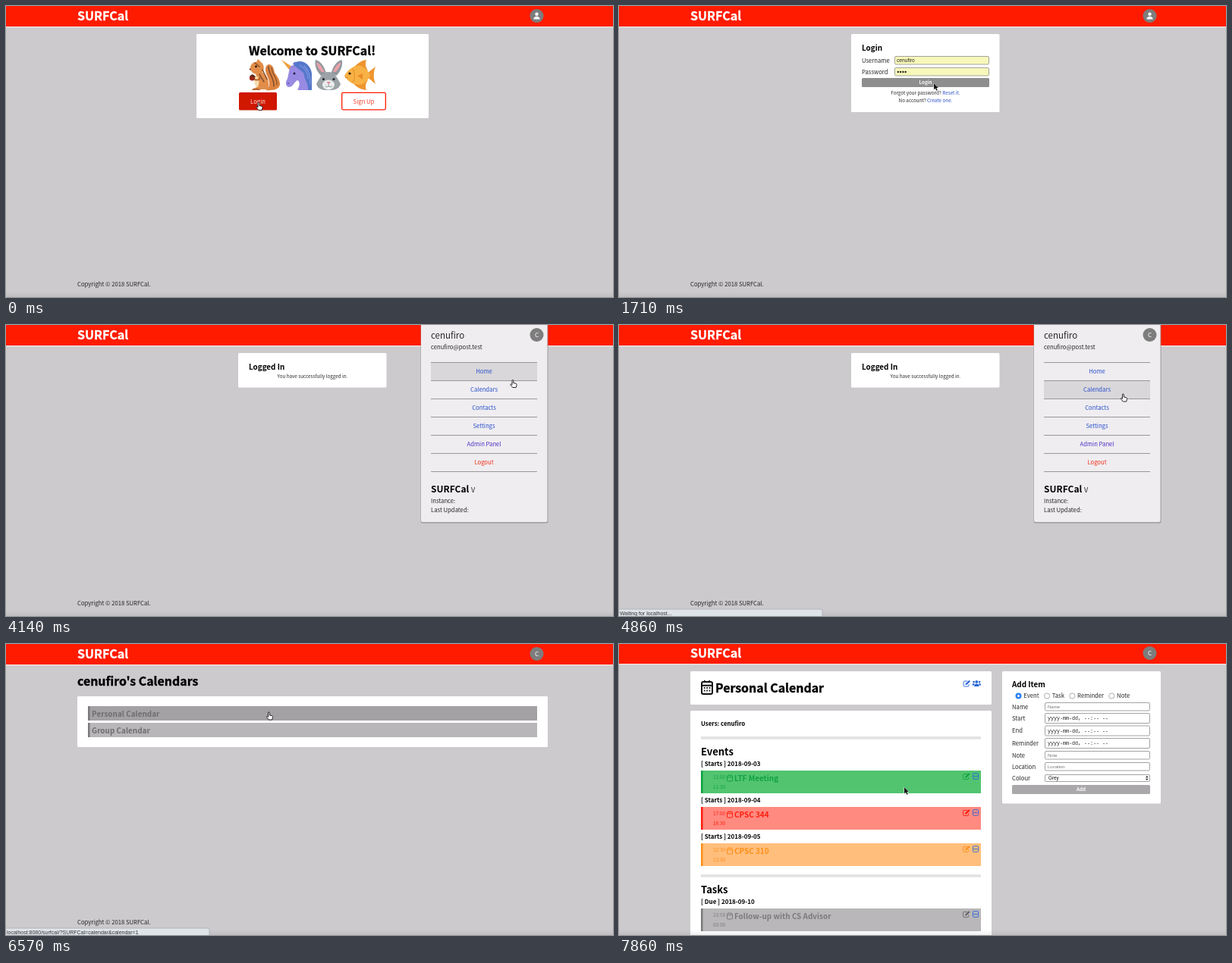
Animation of 800x384 px, one loop 8000 ms. Source, as an HTML page:

```html
<!DOCTYPE html>
<html lang="en">
<head>
<meta charset="utf-8">
<title>SURFCal</title>
<style>
html, body { margin: 0; width: 100%; height: 100%; overflow: hidden; background: #cccacd; }
svg { display: block; width: 100%; height: 100%; }
text { font-family: "Noto Sans CJK JP", "Noto Sans CJK SC", "Noto Sans CJK KR", sans-serif; white-space: pre; }
.bold { font-weight: 700; }
.heavy { stroke: currentColor; stroke-width: .35; }
.mid { text-anchor: middle; }
.end { text-anchor: end; }
.ui { font-family: "Liberation Sans", Arial, sans-serif; }
.mono { font-family: "Liberation Mono", monospace; }
</style>
</head>
<body>
<svg id="stage" viewBox="0 0 800 384" preserveAspectRatio="none"></svg>
<script>
const RED = '#ff1b00', INK = '#262626', BLUE = '#2b51cb', LINK = '#2a66d8';
const TICKS_PER_MS = 7 / 1000, LOOP_TICKS = 56;
const USER = 'cenufiro';

const rect = (x, y, w, h, fill, extra = '') =>
  `<rect x="${x}" y="${y}" width="${w}" height="${h}" fill="${fill}" ${extra}/>`;
const text = (x, y, size, str, fill = INK, cls = '') =>
  `<text x="${x}" y="${y}" font-size="${size}" fill="${fill}" color="${fill}" class="${cls}">${str}</text>`;
const bold = (x, y, size, str, fill = '#000', cls = '') => text(x, y, size, str, fill, 'bold ' + cls);
const circle = (x, y, r, fill, extra = '') => `<circle cx="${x}" cy="${y}" r="${r}" fill="${fill}" ${extra}/>`;
const path = (d, fill, extra = '') => `<path d="${d}" fill="${fill}" ${extra}/>`;
const stroke = (d, color, width) =>
  path(d, 'none', `stroke="${color}" stroke-width="${width}" stroke-linecap="round" stroke-linejoin="round"`);
const group = (id, body, extra = '') => `<g id="${id}" ${extra}>${body}</g>`;
const at = (x, y, body) => `<g transform="translate(${x} ${y})">${body}</g>`;
const card = (x, y, w, h) => rect(x, y, w, h, '#fff', 'rx="1.5"');
const field = (x, y, w, h, fill = '#fff') =>
  rect(x + .5, y + .5, w - 1, h - 1, fill, 'rx="1.5" stroke="#999" stroke-width=".9"');

// Small pictures
const squirrel = () =>
  path('M342 111C350 108 347 98 344 92C341 85 341 79 346 77C352 77 353 83 354 88C357 92 361 97 361 103C361 109 354 112 342 111Z', '#dd8440') +
  stroke('M346 80C345 88 354 95 353 106', '#84502f', 1.6) +
  stroke('M350 81C350 89 358 95 357 104', '#84502f', 1.2) +
  path('M330 87C341 84 348 96 346 110H328C333 105 327 97 330 87Z', '#e28d49') +
  path('M329 91C334 94 335 102 331 108C327 104 326 97 329 91Z', '#f6dcae') +
  path('M322 82C322 76 328 73 330 74L332 70L336 74C341 77 341 86 336 89C330 92 322 88 322 82Z', '#e28d49') +
  stroke('M328 75L334 80M338 84L344 97M334 90L340 100', '#84502f', 1.5) +
  circle(329.5, 80, 1.4, '#30180f') + circle(321.8, 83.5, 1, '#4a2016') +
  circle(324.5, 95, 3.6, '#9c2418') + path('M321 93Q325 87 329 94Z', '#5d2d1c') +
  stroke('M335 94Q334 99 328 97', '#b96631', 2) +
  path('M324 111Q326 107 333 109L336 111Z', '#b96631');

const unicorn = () =>
  path('M363 71L377 80L373 84Z', '#f0a13c') +
  path('M380 73L379 80L386 80Z', '#8d7fd8') +
  path('M374 81C380 74 394 75 400 84C404 91 403 103 403 111H384C388 104 387 99 384 98C380 100 378 107 373 107C368 106 368 100 371 96Z', '#988ae2') +
  path('M378 76C390 68 402 78 403 89V111H398C399 102 393 97 393 91C392 85 385 85 378 76Z', '#5577ca') +
  stroke('M387 78Q398 84 398 96M393 79Q402 88 401 103', '#7b94dd', 1.3) +
  circle(380, 89, 1.5, '#222248') + circle(372, 102, .9, '#5e4fa6');

const rabbit = () => {
  const ear = 'M415 92C409 86 406 77 408 71C414 72 420 80 422 89Z';
  const inner = 'M416 87C411 82 409 77 409.5 74C414 77 418 82 419.5 87Z';
  const half = path(ear, '#91999e') + path(inner, '#eaa0a8');
  return half + `<g transform="translate(850.5 0) scale(-1 1)">${half}</g>` +
    path('M425 87C433 87 437 95 441 103C438 111 432 111 425 111C418 111 412 111 409 103C413 95 417 87 425 87Z', '#9ba3a7') +
    `<ellipse cx="425" cy="104" rx="8" ry="6.5" fill="#e9eced"/>` +
    circle(418.5, 96.5, 1.6, '#25282b') + circle(432, 96.5, 1.6, '#25282b') +
    path('M422.5 100H428L425.2 103Z', '#e57f8c') +
    stroke('M425.2 103V106M421 106Q423 108 425.2 106Q427 108 429.5 106', '#7c8487', .8) +
    rect(423.7, 107, 3, 2.5, '#fff');
};

const fish = () =>
  path('M456 84C462 76 468 72 475 71C473 76 474 81 477 85ZM456 100C461 107 467 110 475 111C473 106 474 102 477 98Z', '#ee952f') +
  path('M473 91L487 80C484 87 484 96 487 103Z', '#ee952f') +
  path('M446 92C452 82 460 78 467 79C474 81 478 87 480 91.5C478 97 473 103 466 104C459 104 451 101 446 92Z', '#f8b145') +
  stroke('M457 83Q462 92 457 101', '#e5912f', 1.1) +
  path('M463 92L470 89V97Z', '#e98b2a') +
  circle(453, 89, 1.6, '#2b2016') + stroke('M447 94L450 95', '#b96a1c', .8);

const calendarIcon = (x, y, w, h, color, lw) => at(x, y,
  rect(lw / 2, lw, w - lw, h - lw * 1.5, 'none', `rx="${lw}" stroke="${color}" stroke-width="${lw}"`) +
  stroke(`M${lw} ${h * .35}H${w - lw}M${w * .3} ${lw / 3}V${lw}M${w * .7} ${lw / 3}V${lw}`, color, lw));
const editIcon = (x, y, color) => at(x, y,
  stroke('M5.5 1.5H1.5Q.6 1.5 .6 2.4V7.6Q.6 8.5 1.5 8.5H6.7Q7.6 8.5 7.6 7.6V6', color, .9) +
  path('M3 6.5L3.4 4.7L8 .2L9.6 1.8L5 6.2Z', color));
const minusIcon = (x, y) => at(x, y,
  rect(.5, .7, 7, 7.6, 'none', `rx=".8" stroke="${LINK}" stroke-width=".9"`) + stroke('M2 4.6H6', LINK, 1));
const usersIcon = (x, y, color) => at(x, y,
  [[2, 2.6, 1.3], [9.6, 2.6, 1.3], [5.8, 2.4, 1.9]].map(c => circle(...c, color)).join('') +
  path('M0 7Q0 4.4 3 4.6L2.4 7ZM11.6 7Q11.6 4.4 8.6 4.6L9.2 7ZM2.6 8.6Q2.4 4.9 5.8 4.9Q9.2 4.9 9 8.6Z', color));
const badge = () => circle(699.5, 13, 9, '#7d7d7d') + text(699.5, 16, 8.2, 'C', '#fff', 'mid');

// Pages
const header = () =>
  rect(0, -2, 800, 29, RED) + rect(0, 27, 800, 1.4, '#f3dedc') +
  bold(94, 18.8, 16.1, 'SURFCal', '#fff', 'heavy') +
  group('guest', circle(699.5, 13, 9, '#7d7d7d') + circle(699.5, 10.8, 2.2, '#fff') +
    path('M695.4 17.4C695.4 12.4 703.6 12.4 703.6 17.4Z', '#fff')) +
  group('member', badge());

const welcome = () => card(251, 37, 306, 111) +
  bold(403.5, 65, 15.9, 'Welcome to SURFCal!', '#000', 'heavy mid') +
  squirrel() + unicorn() + rabbit() + fish() +
  rect(307, 114, 50, 23.5, '#d01700', 'rx="1.5"') + text(332, 128.8, 7.7, 'Login', '#ffe3df', 'mid') +
  rect(442.7, 114.4, 57.6, 22.4, '#fff', `rx="1.5" stroke="${RED}" stroke-width="1.3"`) +
  text(471.5, 128.8, 7.7, 'Sign Up', '#f0402c', 'mid');

const hint = (y, question, link) =>
  text(404, y, 6.3, `${question} <tspan fill="${BLUE}">${link}</tspan>.`, INK, 'mid');
const login = () => card(306, 37, 195.5, 103) +
  bold(320, 58.6, 9.9, 'Login') +
  text(320, 74.8, 7.7, 'Username') + field(363, 66, 125, 11.5, '#f8f8ba') + text(366, 74, 6.7, USER, '#222', 'ui') +
  text(320, 89.8, 7.7, 'Password') + field(363, 81, 125, 11.5, '#f8f8ba') +
  [0, 1, 2, 3].map(i => circle(367.8 + i * 3.3, 87, 1.2, '#222')).join('') +
  rect(320, 95, 168, 12, '#8f8e8f', 'rx="1.5"') + bold(404, 103.4, 6.2, 'Login', '#fff', 'mid') +
  hint(117, 'Forgot your password?', 'Reset it') + hint(127, 'No account?', 'Create one');

const loggedIn = () => card(306, 37, 195.5, 45.5) +
  bold(320, 58.6, 9.9, 'Logged In') +
  text(404, 69.6, 6.3, 'You have successfully logged in.', INK, 'mid');

const menuItems = [['Home', BLUE], ['Calendars', BLUE], ['Contacts', BLUE], ['Settings', BLUE],
  ['Admin Panel', '#4f2fc4'], ['Logout', '#f0301a']];
const panel = () =>
  rect(546.5, -10, 168, 271.5, '#8b898c', 'rx="2.5" opacity=".7"') + rect(547, -10, 166.5, 270, '#efedf0', 'rx="2"') +
  text(560, 18, 11.5, USER) + text(560, 32.4, 7.7, USER + '@post.test') + badge() +
  group('menuHover', rect(560, 49.5, 140, 23.5, '#d9d7da')) +
  menuItems.map(([label, color], i) => text(630, 64.2 + i * 24, 7.7, label, color, 'mid')).join('') +
  [0, 1, 2, 3, 4, 5, 6].map(i => rect(560, 49 + i * 24, 140, .8, '#858386')).join('') +
  bold(560, 220.8, 12, 'SURFCal') + text(613, 220.8, 9, 'V') +
  text(560, 234.8, 7.7, 'Instance:') + text(560, 246.8, 7.7, 'Last Updated:');

const listRow = (y, label, id) => rect(108, y, 592, 19, '#b9b6b9', `id="${id}"`) +
  rect(108, y, 2.5, 19, '#7b797b') + bold(113, y + 13.6, 9.95, label, '#6f6d6f');
const calendars = () =>
  bold(94, 55, 15.9, USER + "'s Calendars", '#000', 'heavy') + card(94, 69, 620, 67) +
  listRow(82, 'Personal Calendar', 'personalRow') + listRow(104, 'Group Calendar', 'groupRow');

const entry = (y, heading, start, end, title, fill, color, edit = color) =>
  bold(108, y - 6, 8, heading) + rect(108, y, 369, 30, fill) + rect(108, y, 2.5, 30, color) +
  text(140, y + 10.6, 6.4, start, color, 'end') + text(140, y + 23.8, 6.4, end, color, 'end') +
  calendarIcon(142, y + 5.5, 8, 9, color, 1) + bold(152, y + 13.6, 9.95, title, color) +
  editIcon(453, y + 3, edit) + minusIcon(466, y + 3);

const formRow = ([label, y, h, hint, cls]) => text(518, y + h / 2 + 2.8, 7.7, label) + field(561, y, 139, h) +
  text(565, y + h / 2 + 2.1, cls === 'mono' ? 6.67 : 6, hint, cls === 'mono' ? '#222' : '#777', cls);
const DATE_HINT = 'yyyy-mm-dd, --:-- --';
const detail = () =>
  card(94, 36, 397, 44) + calendarIcon(108, 48, 16, 19, '#111', 2) +
  [0, 1, 2, 3, 4, 5].map(i => rect(111.8 + i % 3 * 3.4, 57 + (i / 3 | 0) * 3.6, 1.8, 1.8, '#111')).join('') +
  bold(127, 64, 15.9, 'Personal Calendar', '#000', 'heavy') +
  editIcon(453.5, 47.5, LINK) + usersIcon(465.5, 47.5, LINK) +
  card(94, 88, 397, 310) + bold(108, 107.8, 7.9, 'Users: ' + USER) +
  rect(108, 122, 369, 3.8, '#e4e2e5') + bold(108, 147, 13, 'Events') +
  entry(167, '[ Starts ] 2018-09-03', '11:00', '11:30', 'LTF Meeting', '#52c470', '#10a143') +
  entry(215, '[ Starts ] 2018-09-04', '17:00', '18:30', 'CPSC 344', '#ff8a80', '#ff1d0c') +
  entry(263, '[ Starts ] 2018-09-05', '12:30', '13:30', 'CPSC 310', '#ffbe7c', '#ff8f17') +
  rect(108, 304, 369, 3.8, '#e4e2e5') + bold(108, 329, 13, 'Tasks') +
  entry(349, '[ Due ] 2018-09-10', '23:59', '00:00', 'Follow-up with CS Advisor', '#b9b7b9', '#7c7a7c', '#666') +
  card(505, 36, 209, 174.5) + bold(518, 57.4, 9.9, 'Add Item') +
  [[526.5, 'Event'], [564, 'Task'], [597.3, 'Reminder'], [649.3, 'Note']].map(([x, label], i) =>
    (i ? circle(x, 68.5, 3.6, '#fff', 'stroke="#999" stroke-width=".8"')
       : circle(x, 68.5, 4, '#2f82f3') + circle(x, 68.5, 1.5, '#fff')) +
    text(x + 6.8, 71.2, 7.7, label)).join('') +
  [['Name', 77, 11.5, 'Name', 'ui'], ['Start', 91, 14, DATE_HINT, 'mono'], ['End', 107.5, 14, DATE_HINT, 'mono'],
    ['Reminder', 124, 14, DATE_HINT, 'mono'], ['Note', 141, 11.5, 'Note', 'ui'],
    ['Location', 156, 11.5, 'Location', 'ui']].map(formRow).join('') +
  text(518, 180, 7.7, 'Colour') + field(561, 172, 139, 10) + text(566, 179.2, 6.3, 'Grey', '#111', 'ui') +
  path('M694 176.3L695.8 173.9L697.6 176.3ZM694 177.7L695.8 180.1L697.6 177.7Z', '#222') +
  rect(518, 186, 182, 12, '#aaa8aa', 'rx="1.5"') + bold(609, 194.3, 6.2, 'Add', '#fff', 'mid');

const status = () =>
  rect(-2, 375, 270, 12, '#dfe4e8', 'rx="2" stroke="#a9abaf" stroke-width=".8"') +
  `<text id="statusText" class="ui" x="1" y="382.6" font-size="7" fill="#333"></text>`;

const pages = { welcome, login, loggedIn, calendars, detail };
document.getElementById('stage').innerHTML =
  `<defs><linearGradient id="fade" x2="0" y2="1"><stop stop-opacity="0"/><stop offset="1" stop-opacity=".06"/></linearGradient></defs>` +
  group('scroller',
    group('footer', text(94, 369.6, 7.7, 'Copyright © 2018 SURFCal.')) + header() +
    Object.entries(pages).map(([id, draw]) =>
      group(id, draw(), id === 'detail' ? 'transform="translate(0 1)"' : '')).join('') +
    group('panel', panel())) +
  rect(0, 377, 800, 7, 'url(#fade)') + group('status', status()) +
  group('arrow', path('M0 0V8.4L1.9 6.6L3.3 9.8L4.7 9.2L3.3 6.1H5.9Z', '#111',
    'stroke="#fff" stroke-width="1" paint-order="stroke" stroke-linejoin="round"')) +
  group('hand', path('M0 1C0 -.5 1.8 -.5 1.8 1V4L5 4.7C6.2 5.1 6.2 5.9 5.9 7.3L5.2 10H.8L-2 6.6C-2.4 5.7 -1.6 5 -.6 5.8L0 6.4Z',
    '#fff', 'stroke="#111" stroke-width=".9" stroke-linejoin="round"'));

// Timeline, in ticks of 1/7 s
const pageTimes = [[0, 'welcome'], [4, 'login'], [15, 'loggedIn'], [36, 'calendars'], [49, 'detail']];
const statusTimes = [[0, ''], [2, 'Waiting for localhost...'], [4, ''],
  [31, 'localhost:8080/surfcal/?SURFCal=calendars'], [34, 'Waiting for localhost...'],
  [36, 'Waiting for extension Leaf Pager...'], [39, 'localhost:8080/surfcal/?SURFCal=calendar&calendar=1'],
  [48, 'Waiting for localhost...'], [49, 'Waiting for extension Leaf Pager...'], [51, '']];
const cursorPath = [[0, 332, 127.5], [4, 332, 127.5], [10, 415, 102], [15, 415, 102], [21, 699, 14], [24, 705, 12],
  [28, 667, 72.5], [29, 667, 72.5], [31, 663.5, 91], [38, 663.5, 91], [45, 345.5, 90], [49, 345.5, 90], [54, 376, 189]];
const panelSlide = [[23, -262], [24, -177.4], [25, -45], [26, 0]];

const current = (steps, tick) => steps.filter(([start]) => start <= tick).pop()[1];
const smooth = p => p * p * (3 - 2 * p);
function track(keys, tick) {
  const next = keys.findIndex(([time]) => time > tick);
  if (next === 0) return keys[0].slice(1);
  if (next < 0) return keys[keys.length - 1].slice(1);
  const [t0, ...from] = keys[next - 1], [t1, ...to] = keys[next];
  const p = smooth((tick - t0) / (t1 - t0));
  return from.map((v, i) => v + (to[i] - v) * p);
}

const el = id => document.getElementById(id);
const show = (id, on) => el(id).setAttribute('display', on ? 'inline' : 'none');
const move = (id, x, y) => el(id).setAttribute('transform', `translate(${x} ${y})`);

function render(ms) {
  const tick = Math.floor(ms * TICKS_PER_MS + .1) % LOOP_TICKS;
  const page = current(pageTimes, tick), message = current(statusTimes, tick);
  for (const id in pages) show(id, id === page);
  const signedIn = tick >= 15;
  show('guest', !signedIn);
  show('member', signedIn);
  show('footer', page !== 'detail');
  move('scroller', 0, tick >= 54 ? -1 : 0);

  show('panel', tick >= 24 && tick < 36);
  move('panel', 0, track(panelSlide, tick)[0]);
  show('menuHover', tick >= 28);
  move('menuHover', 0, tick >= 30 ? 24 : 0);
  el('personalRow').setAttribute('fill', tick >= 39 ? '#a3a1a4' : '#b9b6b9');

  show('status', message);
  el('statusText').textContent = message;

  const [x, y] = track(cursorPath, tick);
  const pointing = tick < 4 || (tick >= 27 && tick < 49);
  show('hand', pointing);
  show('arrow', !pointing);
  move(pointing ? 'hand' : 'arrow', x, y);
}

function loop() {
  render(performance.now());
  requestAnimationFrame(loop);
}
loop();
</script>
</body>
</html>
```
